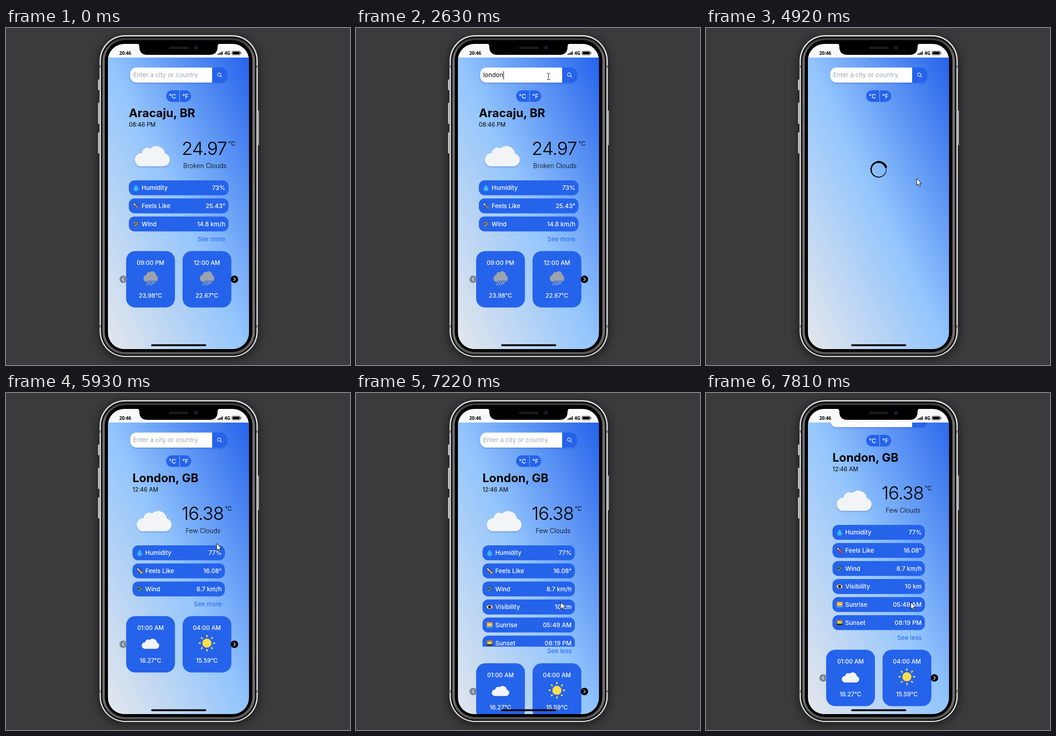
Recreate the animation shown at these times as an HTML page. Size 756 by 741 pixels, loop 8 s.

```html
<!DOCTYPE html>
<html lang="en">
<head>
<meta charset="utf-8">
<title>Weather app</title>
<style>
  html, body { margin: 0; width: 100%; height: 100%; overflow: hidden; background: #3b3b3d; }
  svg { display: block; width: 100%; height: 100%; }
  text { font: 400 13.6px Inter, "Open Sans", sans-serif; }
  .status { font: 700 10.2px "Open Sans", "Noto Sans", sans-serif; }
  .white { fill: #fff; font-size: 13.4px; font-weight: 500; }
  .card { fill: #fff; font-size: 12.9px; font-weight: 500; text-anchor: middle; }
  .city { font-size: 25.8px; font-weight: 700; }
  .time { font-size: 12.7px; }
  .temp { font-size: 40px; font-weight: 300; letter-spacing: -1px; }
  .sky { font-size: 14px; font-weight: 350; }
  .mid { text-anchor: middle; }
  .end { text-anchor: end; }
  .line { fill: none; stroke-linecap: round; stroke-linejoin: round; }
</style>
</head>
<body>
<svg viewBox="0 0 756 741">
  <defs>
    <linearGradient id="sky" x1="0" y1="1" x2="1" y2="0">
      <stop offset="0" stop-color="#e5e7eb"/><stop offset=".5" stop-color="#93c5fd"/><stop offset="1" stop-color="#2563eb"/>
    </linearGradient>
    <linearGradient id="steel" x2="0" y2="1">
      <stop offset="0" stop-color="#3a3a3a"/><stop offset=".06" stop-color="#6f6f6f"/>
      <stop offset=".94" stop-color="#6f6f6f"/><stop offset="1" stop-color="#555"/>
    </linearGradient>
    <filter id="blur" x="-20%" y="-20%" width="140%" height="140%"><feGaussianBlur stdDeviation="10"/></filter>
    <filter id="soft" x="-20%" y="-20%" width="140%" height="150%">
      <feDropShadow dx="0" dy="2" stdDeviation="1.6" flood-color="#1e3a8a" flood-opacity=".28"/>
    </filter>
    <clipPath id="screen"><rect x="224" y="35" width="310" height="671" rx="36"/></clipPath>
    <clipPath id="page"><rect x="224" y="65" width="310" height="641"/></clipPath>
    <clipPath id="fold"><rect id="foldBox" x="224" y="330" width="310" height="124"/></clipPath>
    <path id="cloud" d="M14 0A14.5 14.5 0 0 1 17-28.8A12.5 12.5 0 0 1 36-39A19 19 0 0 1 68-28A14.3 14.3 0 0 1 65 0Z"/>
  </defs>

  <rect width="756" height="741" fill="#3b3b3d"/>
  <rect x="204" y="18" width="351" height="710" rx="56" opacity=".55" filter="url(#blur)"/>
  <g fill="#d4d4d4" stroke="#222" stroke-width=".6">
    <rect x="202" y="113" width="5" height="24" rx="1.5"/><rect x="202" y="164" width="5" height="47" rx="1.5"/>
    <rect x="202" y="229" width="5" height="47" rx="1.5"/><rect x="551" y="181" width="5" height="77" rx="1.5"/>
  </g>
  <rect x="205" y="15" width="349" height="709" rx="57" fill="#5c5c5c"/>
  <rect x="206" y="16" width="347" height="707" rx="56" fill="#ececec"/>
  <rect x="208.5" y="18.5" width="342" height="702.5" rx="53.5" fill="#151515"/>
  <rect x="212" y="22.5" width="335" height="695" rx="50" fill="url(#steel)"/>
  <rect x="217" y="26.5" width="324.5" height="686" rx="45" fill="#000"/>
  <path d="M205 85h4M205 656h4M550 85h4M550 656h4" stroke="#777" stroke-width="5"/>

  <g clip-path="url(#screen)">
    <rect x="224" y="35" width="310" height="31" fill="#f9f9f9"/>
    <g clip-path="url(#page)">
      <g id="content">
        <rect id="backdrop" x="224" y="65" width="310" height="641" fill="url(#sky)"/>
        <g filter="url(#soft)">
          <path d="M453 87H287a14 14 0 0 0-14 14v5a14 14 0 0 0 14 14h166z" fill="#fff"/>
          <path id="button" d="M453 87h19a14 14 0 0 1 14 14v5a14 14 0 0 1-14 14h-19z"/>
        </g>
        <g id="lens" class="line" stroke-width="1.2"><circle cx="468.5" cy="102.5" r="3.7"/><path d="M471.3 105.3l3 3"/></g>
        <text id="query" x="279.5" y="108.3"></text>
        <path id="caret" d="M0 95v18" stroke="#000"/>
        <rect x="352" y="137" width="55" height="25.5" rx="12.7" fill="#2563eb"/>
        <path d="M381.5 137v25.5" stroke="#93c5fd"/>
        <text class="white mid" x="366" y="155">°C</text><text class="white mid" x="394.5" y="155">°F</text>
        <g id="before"></g>
        <g id="after"></g>
        <g id="spinner" class="line" stroke="#000"></g>
      </g>
    </g>
    <path d="M286 34q7 0 7 7q0 18 18 18h136q18 0 18-18q0-7 7-7z"/>
    <rect x="358" y="41" width="43" height="5.5" rx="2.7" fill="#1b1b1d"/>
    <circle cx="417.5" cy="43.5" r="5" fill="#13141b"/><circle cx="417.5" cy="43.5" r="1.8" fill="#1d2a63"/>
    <text class="status" x="249" y="58.5">20:46</text><text class="status" x="480" y="59">4G</text>
    <path d="M466.2 59v-2.5M469.2 59v-4M472.2 59v-5.5M475.2 59v-7.5" stroke="#000" stroke-width="2"/>
    <rect x="496.5" y="51" width="18.5" height="8" rx="2" fill="#fff" stroke="#000" stroke-width=".8"/>
    <rect x="498" y="52.3" width="15.5" height="5.4" rx="1"/><path d="M516.5 53.5v3" stroke="#000"/>
    <rect x="319" y="695.5" width="121" height="4" rx="2"/>
  </g>

  <g id="pointer" stroke="#000" stroke-linejoin="round" fill="#fff">
    <path id="arrow" d="M0 0V15L3.5 11.9L6 17.3L8.4 16.3L6 11H10.6Z"/>
    <path id="hand" d="M-1.6 11V1.6a1.6 1.6 0 0 1 3.2 0V7q1.6-1 3 .5q1.6-.8 3 .6q2.4-.5 2.6 1.7V14q0 3-1.8 5v2H.4v-2L-4.8 12.8q-1-2.4 1.1-2.5zM1.6 7v3.6M4.6 7.5v3.3M7.6 8.2v3"/>
    <path id="beam" fill="none" d="M-3.5-7H-1L0-6L1-7H3.5M0-6V6M-3.5 7H-1L0 6L1 7H3.5"/>
  </g>
</svg>

<script>
const LOOP = 8000;
const SEARCH = 3880, LOADING = 4000, LOADED = 4960, EXPAND = 6930;
const GROWTH = 119, PITCH = 39.7;
const $ = id => document.getElementById(id);
const show = (id, on) => $(id).style.display = on ? '' : 'none';
const text = (x, y, content, cls = '', extra = '') => `<text x="${x}" y="${y}" class="${cls}" ${extra}>${content}</text>`;

// Small icons, each drawn around its own centre.
const sunOver = (sky, land) => `<rect x="-6.5" y="-6" width="13" height="12" rx="1" fill="${sky}"/>
  <circle r="4" cy="1" fill="#fde047"/><path d="M-6.5 2h13v4h-13z" fill="${land}"/>`;
const icons = {
  drop: '<path d="M0-7Q5.5 0 5.5 2.5A5.3 4.6 0 0 1-5.5 2.5Q-5.5 0 0-7Z" fill="#38b6f5"/>',
  thermo: color => `<g class="line"><path d="M-4.5-4.5L4 4" stroke="#111" stroke-width="5"/>
    <path d="M-4.5-4.5L4 4" stroke="#f3f4f6" stroke-width="3"/><path class="mercury" d="M-2-2L4 4" stroke="${color}" stroke-width="2"/>
    <circle class="mercury" cx="4" cy="4" r="1.5" stroke="${color}" stroke-width="2"/></g>`,
  wind: color => `<path d="M-6-4Q0-8 6-4Q7 1 2 6Q-4 7-5 2Z" fill="${color}"/>
    <path class="line" d="M-5-2Q0-5 3-2T-1 2M-4 4H1" stroke="#9db4c8" stroke-width="1.2"/>`,
  eye: '<ellipse rx="7" ry="5" fill="#f5f5f5" stroke="#333"/><circle r="3.8" fill="#6b4534"/><circle r="2"/>',
  sunrise: sunOver('#f9a03c', '#5b9bd5'),
  sunset: sunOver('#b9853e', '#34363f')
};
const cloud = (x, y, scale) => `<use href="#cloud" fill="#f3f4f6" filter="url(#soft)" transform="translate(${x} ${y}) scale(${scale})"/>`;
const drops = (color, width) => `<path d="M-4 7l-5 8M1 7l-5 8M6 7l-5 8M10 7l-4 6" stroke="${color}" stroke-width="${width}"/>`;
const forecastIcons = {
  rain: `<use href="#cloud" fill="#9ca3af" filter="url(#soft)" transform="translate(-16 8) scale(.41 .52)"/>
    <g class="line">${drops('#2563eb', 4)}${drops('#9ca3af', 2)}</g>`,
  cloud: cloud(-20, 12.5, .5),
  sun: '<circle r="10" fill="#fde047"/>' + [...Array(8)].map((_, i) =>
    `<path d="M0-13.5v-4.5" stroke="#fde047" stroke-width="3" transform="rotate(${i * 45})"/>`).join('')
};

function row(w, [icon, label, value], i) {
  const y = 335 + i * PITCH;
  return `<rect x="${w.left}" y="${y}" width="${w.right - w.left}" height="32.8" rx="12.5" fill="#2563eb"/>
    <g transform="translate(${w.left + 15.7} ${y + 16.4})">${icon}</g>` +
    text(w.left + 28, y + 21.2, label, 'white') + text(w.right - 7, y + 21.2, value, 'white end');
}

function forecast([time, icon, temp], i) {
  const mid = 317.5 + i * 124;
  return `<rect x="${mid - 53.5}" y="490.5" width="107.3" height="124" rx="20" fill="#2563eb"/>` +
    text(mid, 521.3, time, 'card') + text(mid, 592.5, temp, 'card') +
    `<g transform="translate(${mid} 550)">${forecastIcons[icon]}</g>`;
}

const weather = w => text(w.left, 196, w.city, 'city') + text(w.left, 217, w.time, 'time') +
  cloud(w.cloudX, 304, 1) + text(386, 278.5, w.temp, 'temp') + text(w.unitX, 259, '°C', 'time') +
  text(w.skyX, 308.3, w.sky, 'sky mid') +
  `<g clip-path="url(#fold)">${w.rows.map((r, i) => row(w, r, i)).join('')}</g>
  <g class="lower">${text(w.right - 7, 468.5, 'See more', 'end more', 'fill="#2563eb"')}
    ${w.forecast.map(forecast).join('')}
    <circle cx="257.5" cy="552.5" r="8.2" fill="#7b8594"/><circle cx="502" cy="552.5" r="8.2"/>
    <path class="line" d="M259 549l-3.5 3.5l3.5 3.5M500.5 549l3.5 3.5l-3.5 3.5" stroke="#fff" stroke-width="1.3"/></g>`;

$('before').innerHTML = weather({
  city: 'Aracaju, BR', time: '08:46 PM', temp: '24.97', sky: 'Broken Clouds',
  left: 270, right: 489, cloudX: 281.5, unitX: 489, skyX: 437.2,
  rows: [[icons.drop, 'Humidity', '73%'], [icons.thermo('#777'), 'Feels Like', '25.43°'], [icons.wind('#565d68'), 'Wind', '14.8 km/h']],
  forecast: [['09:00 PM', 'rain', '23.98°C'], ['12:00 AM', 'rain', '22.67°C']]
});
$('after').innerHTML = weather({
  city: 'London, GB', time: '12:46 AM', temp: '16.38', sky: 'Few Clouds',
  left: 278, right: 481, cloudX: 285.5, unitX: 481, skyX: 433.2,
  rows: [[icons.drop, 'Humidity', '77%'], [icons.thermo('#f59e2c'), 'Feels Like', '16.08°'], [icons.wind('#1f5673'), 'Wind', '8.7 km/h'],
    [icons.eye, 'Visibility', '10 km'], [icons.sunrise, 'Sunrise', '05:49 AM'], [icons.sunset, 'Sunset', '08:19 PM']],
  forecast: [['01:00 AM', 'cloud', '16.27°C'], ['04:00 AM', 'sun', '15.59°C']]
});
const lower = document.querySelector('#after .lower');
const more = document.querySelector('#after .more');
const mercury = document.querySelectorAll('#after .mercury');

// Ring that tapers away behind its head.
$('spinner').innerHTML = [...Array(36)].map((_, i) =>
  `<path d="M16.7 0A16.7 16.7 0 0 0 ${16.7 * Math.cos(.175)} ${-16.7 * Math.sin(.175)}" stroke-width="${.8 + 4 * (1 - i / 36) ** 1.3}" transform="rotate(${-20 - i * 10})"/>`).join('');

const clamp = v => Math.min(1, Math.max(0, v));
const progress = (t, from, to) => clamp((t - from) / (to - from));
const smooth = p => p * p * (3 - 2 * p);

// CSS "ease" timing curve.
function cssEase(x) {
  let lo = 0, hi = 1;
  for (let i = 0; i < 20; i++) {
    const u = (lo + hi) / 2;
    if (.75 * u * (1 - u) + u ** 3 < x) lo = u; else hi = u;
  }
  return .3 * lo * (1 - lo) ** 2 + 3 * lo * lo * (1 - lo) + lo ** 3;
}

const moves = [
  [170, 980, 423, 106.5], [3140, 3860, 465, 107.5], [4200, 4800, 463, 331], [5930, 6710, 450, 460]
];
function pointerAt(t) {
  let x = 715, y = 752;
  for (const [from, to, nextX, nextY] of moves) {
    const p = smooth(progress(t, from, to));
    x += (nextX - x) * p;
    y += (nextY - y) * p;
  }
  return [x, y];
}

const keyTimes = [1740, 1940, 2160, 2370, 2400, 2630];
const within = (x, y, x0, y0, x1, y1) => x >= x0 && x <= x1 && y >= y0 && y <= y1;

function render(t) {
  const growth = GROWTH * cssEase(progress(t, EXPAND, EXPAND + 500));
  const scroll = 45 * progress(t, 7735, 7810);
  const [x, y] = pointerAt(t);

  $('content').setAttribute('transform', `translate(0 ${-scroll})`);
  $('backdrop').setAttribute('height', Math.max(641, 567 + growth));
  $('foldBox').setAttribute('height', 123.8 + growth);
  lower.setAttribute('transform', `translate(0 ${growth})`);
  show('before', t < LOADING);
  show('after', t >= LOADED);
  show('spinner', t >= LOADING && t < LOADED);
  $('spinner').setAttribute('transform', `translate(379.5 311.2) rotate(${(t - 4920) * .36})`);
  mercury.forEach(m => m.setAttribute('stroke', scroll ? '#dc2f3c' : '#f59e2c'));

  const typed = t < SEARCH ? 'london'.slice(0, keyTimes.filter(k => t >= k).length) : '';
  $('query').textContent = typed || 'Enter a city or country';
  $('query').setAttribute('fill', typed ? '#000' : '#9ca3af');
  show('caret', t >= 1220 && t < SEARCH && !(t >= 3140 && t < 3650));
  $('caret').setAttribute('transform', `translate(${typed ? 280.5 + $('query').getComputedTextLength() : 279.5} 0)`);

  const onButton = within(x, y, 453, 87, 486, 120);
  const onInput = within(x, y, 273, 87, 452.9, 120);
  const onMore = t >= LOADED && within(x, y, 411, 454 + growth, 474, 474 + growth);
  $('button').setAttribute('fill', onButton ? '#93c5fd' : '#2563eb');
  $('lens').setAttribute('stroke', onButton ? '#000' : '#fff');
  more.setAttribute('fill', onMore ? '#4548a8' : '#2563eb');
  more.textContent = t >= EXPAND ? 'See less' : 'See more';

  $('pointer').setAttribute('transform', `translate(${x} ${y})`);
  show('beam', onInput);
  show('hand', onButton || onMore);
  show('arrow', !onInput && !onButton && !onMore);
}

function frame() {
  render(performance.now() % LOOP);
  requestAnimationFrame(frame);
}
frame();
</script>
</body>
</html>
```
